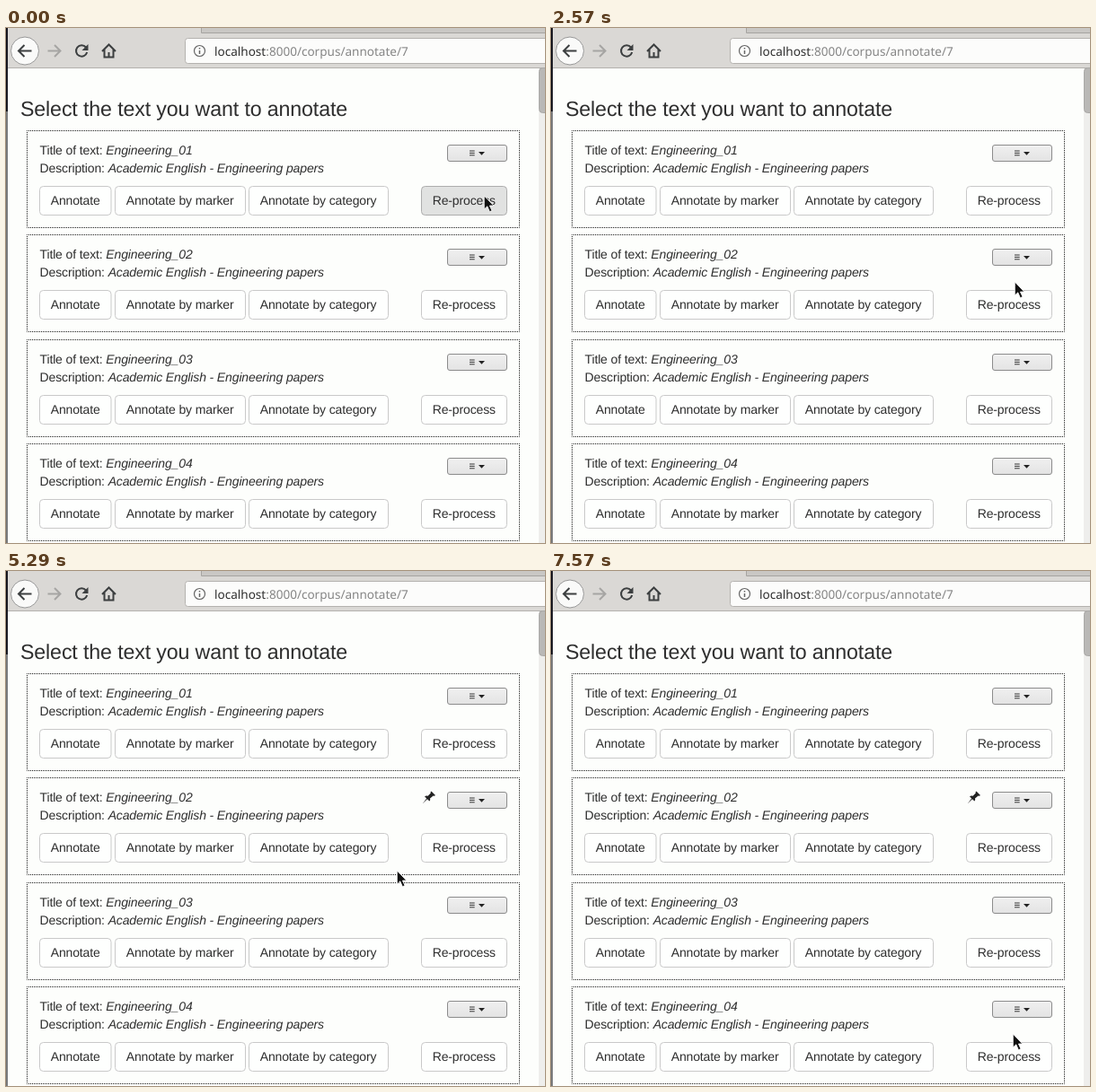
These frames come from a looping animation (600 by 574 pixels, 8 s). An HTML page:

```html
<!DOCTYPE html>
<html lang="en">
<head>
<meta charset="utf-8">
<title>Select a text</title>
<style>
  html, body { margin: 0; width: 100%; height: 100%; overflow: hidden; background: #fdfefc; }
  svg { display: block; width: 600px; height: 574px; text-rendering: geometricPrecision; }
  text { font: 14px "Liberation Sans", Arial, sans-serif; letter-spacing: -.13px; fill: #2e2e2e; white-space: pre; }
  .heading { font-size: 23.2px; }
  .url { font: 13.55px "Noto Sans", "Open Sans", sans-serif; letter-spacing: 0; }
  .item { font-size: 10px; letter-spacing: 0; }
  .title { font-style: italic; }
  .card { fill: none; stroke: #1c1c1c; stroke-dasharray: 1 1; stroke-dashoffset: .5; }
  .button { fill: #fefffe; stroke: #c9c9c9; }
  .button.hover { fill: #e1e2e1; stroke: #adadad; }
  .toggle { fill: url(#bevel); stroke: #8c8c8c; }
  .toggle.hover { fill: #f1f1f1; }
  .focus { fill: none; stroke: #888; stroke-dasharray: 1 1; stroke-dashoffset: .5; }
  .menu { fill: #fefffe; stroke: #ccc; filter: drop-shadow(0 5px 5px rgba(0, 0, 0, .17)); }
  .icon { fill: none; stroke: #3c3f40; stroke-width: 2; }
</style>
</head>
<body>
<svg id="stage" viewBox="0 0 600 574">
  <defs>
    <linearGradient id="bevel" x2="0" y2="1">
      <stop stop-color="#f0f0f0"/><stop offset="1" stop-color="#e3e3e3"/>
    </linearGradient>
  </defs>

  <!-- browser chrome -->
  <path fill="#dad8d5" d="M2 0H600V45H2Z"/>
  <path fill="#c9c7c4" d="M218 0H600V5H218Z"/>
  <path fill="none" stroke="#a5a3a0" d="M217.5 0V5.5H600"/>
  <path stroke="#b3b1ae" d="M2 44.5H600"/>
  <circle cx="21" cy="25.5" r="15.5" fill="#fafaf9" stroke="#999"/>
  <path class="icon" d="M28.5 25.5H14.5M20.5 19L14 25.5L20.5 32"/>
  <path class="icon" style="stroke:#a6a5a3" d="M46.5 25.5H60M54 19L60.5 25.5L54 32"/>
  <path class="icon" d="M89 21.5A6.2 6.2 0 1 0 90.2 27"/>
  <path fill="#3c3f40" d="M91.5 18V25H84.5Z"/>
  <path class="icon" d="M107 26L114.5 18.5L122 26M109.5 24V32.5H119.5V24M114.5 32V27"/>
  <rect x="199.5" y="11.5" width="410" height="28" rx="3" fill="#fcfcfb" stroke="#b4b2af"/>
  <circle cx="215.5" cy="25.5" r="6" fill="none" stroke="#666" stroke-width="1.2"/>
  <path stroke="#666" stroke-width="1.5" d="M215.5 22V23.5M215.5 25V29"/>
  <text class="url" x="232" y="31">localhost<tspan fill="#858585">:8000/corpus/annotate/7</tspan></text>
  <path fill="#eeeeec" d="M593 45H600V574H593Z"/>
  <rect x="593.5" y="44.5" width="14" height="50" rx="4" fill="#b9b8b6" stroke="#a9a8a6"/>
  <path fill="#77787a" d="M0 0H2V574H0Z"/>
  <path fill="#16161e" d="M0 0H2V93H0Z"/>

  <text class="heading" x="16" y="97.5">Select the text you want to annotate</text>
  <g id="cards"></g>

  <path id="pin" fill="#222" d="M473.5 245.5L478 250L476.8 250.8L475.6 250.4L472 253.4Q472.6 255.4 471.4 256.4L469 254.2L464 259L468.2 253.4L466 251.2Q467.6 250.2 469.6 250.8L472.8 247.5L472.5 246.4Z"/>

  <g id="dropdown">
    <rect class="focus" x="494.5" y="132.5" width="60" height="14"/>
    <rect class="menu" x="470.5" y="151.5" width="86.5" height="49" rx="3"/>
    <path id="itemHover" fill="#f3f4f3" d="M471 156H556.5V175H471Z"/>
    <text class="item" x="489.5" y="169.5">Pin text</text>
    <text class="item" x="489.5" y="188.5">Mark done</text>
  </g>

  <g id="cursor" fill="#111" stroke="#fff" stroke-width=".8">
    <path id="arrow" d="M-.7 0V15L2.8 11.8L5.4 17.8L8 16.6L5.4 11H9.8Z"/>
    <path id="hand" d="M-1.5 1Q0 -1 1.5 1V5L6.5 6.2Q8 6.7 7.7 8.5L6.5 12V15.5H-2V13L-6 8.5Q-6 6.5 -4 7.2L-1.5 9Z"/>
  </g>
</svg>
<script>
const $ = id => document.getElementById(id);
const DURATION = 8000, FPS = 7;
const rowOffset = row => Math.floor(116.5 * row);

const button = (x, width, label, kind = "") =>
  `<rect class="button ${kind}" x="${x}" y="176.5" width="${width}" height="32" rx="4"/>
   <text x="${x + 12.2}" y="196.5">${label}</text>`;

const card = row => `<g transform="translate(0 ${rowOffset(row)})">
  <rect class="card" x="23.5" y="114.5" width="548" height="108"/>
  <text x="37.5" y="141.3">Title of text: <tspan class="title">Engineering_0${row + 1}</tspan></text>
  <text x="37.5" y="160.5">Description: <tspan class="title">Academic English - Engineering papers</tspan></text>
  ${button(37.5, 79.5, "Annotate")}
  ${button(121.5, 145, "Annotate by marker")}
  ${button(270.5, 155, "Annotate by category")}
  ${button(462.5, 95, "Re-process", "process")}
  <rect class="toggle" x="491.5" y="130.5" width="66" height="18" rx="2.5"/>
  <path stroke="#333" d="M516 137H521.7M516 139.4H521.7M516 141.8H521.7"/>
  <path fill="#222" d="M526 138H533L529.5 141.8Z"/>
</g>`;

$("cards").innerHTML = [0, 1, 2, 3].map(card).join("");

// Pointer stops: [tick, x, y], with seven ticks to the second
const path = [
  [0, 533, 187], [5, 523, 257], [9, 523, 257], [11, 521, 273], [13, 518, 281], [16, 517, 283],
  [22, 517, 283], [29, 454, 236], [31, 455, 238], [37, 436, 334], [42, 518, 492],
  [48, 518, 492], [52, 515, 516], [56, 515, 516]
];
const openings = [{ row: 1, from: 8, to: 18 }, { row: 3, from: 47, to: 53 }];
const PIN_TICK = 21;

function pointerAt(tick) {
  const next = Math.max(1, path.findIndex(stop => stop[0] >= tick));
  const [t0, x0, y0] = path[next - 1], [t1, x1, y1] = path[next];
  const u = (tick - t0) / (t1 - t0), eased = u * u * (3 - 2 * u);
  return [x0 + (x1 - x0) * eased, y0 + (y1 - y0) * eased];
}

const show = (id, visible) => $(id).style.display = visible ? "" : "none";

function markHover(selector, x, y, left, top, right, bottom) {
  let any = false;
  document.querySelectorAll(selector).forEach((box, row) => {
    const localY = y - rowOffset(row);
    const inside = x >= left && x <= right && localY >= top && localY <= bottom;
    box.classList.toggle("hover", inside);
    any ||= inside;
  });
  return any;
}

function draw(now) {
  const tick = Math.floor((now % DURATION + 5) * FPS / 1000) % 56;
  const [x, y] = pointerAt(tick);
  const opening = openings.find(o => tick >= o.from && tick < o.to);

  markHover(".process", x, y, 462, 176, 558, 209);
  const onToggle = markHover(".toggle", x, y, 491, 130, 558, 149);
  show("hand", onToggle);
  show("arrow", !onToggle);
  $("cursor").setAttribute("transform", `translate(${x} ${y})`);

  show("pin", tick >= PIN_TICK);
  show("dropdown", opening);
  if (opening) {
    const offset = rowOffset(opening.row);
    $("dropdown").setAttribute("transform", `translate(0 ${offset})`);
    show("itemHover", y - offset >= 155);
  }
}

function loop() {
  draw(performance.now());
  requestAnimationFrame(loop);
}
loop();
</script>
</body>
</html>
```
